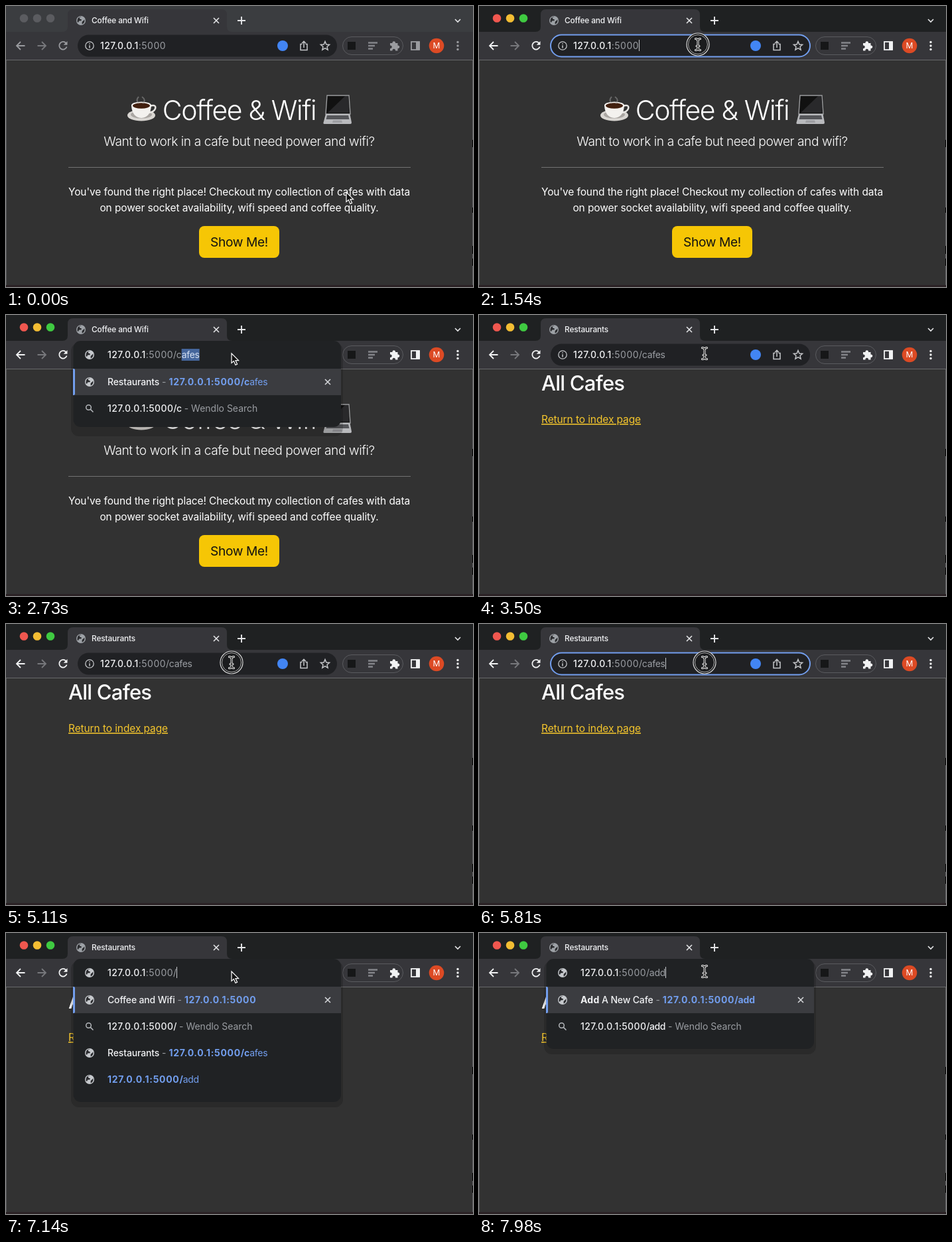
Write an HTML page that moves like this. It is 704 px wide and 424 px high and loops after 8 s.

```html
<!DOCTYPE html>
<html lang="en">
<head>
<meta charset="utf-8">
<title>Coffee and Wifi</title>
<style>
  html, body { margin: 0; width: 100%; height: 100%; overflow: hidden; background: #323232; }
  svg { display: block; width: 704px; height: 424px; --strip: #1f2122; --icon: #f1f2f3; }
  svg.idle { --strip: #3b3d40; --icon: #9a9b9f; }
  text { font-family: Inter, Roboto, sans-serif; font-optical-sizing: none; white-space: pre; fill: #fff; }
  .line { fill: none; stroke: var(--icon); stroke-width: 1.8; }
  .pale { fill: none; stroke: #c4c6c9; stroke-width: 1.5; }
  .ui { font-size: 14px; }
  .mid { text-anchor: middle; }
  .body { font-size: 15.5px; letter-spacing: -.1px; }
  .w, .W { fill: #f1f2f4; }
  .g { fill: #9a9da2; }
  .b, .B { fill: #729eee; }
  .lit { fill: #d5e0f2; }
  .w { font-weight: 500; letter-spacing: -.15px; }
  .W, .B { font-weight: 700; letter-spacing: .22px; }
  .num { letter-spacing: .5px; }
  .w.num { letter-spacing: .35px; }
  .B.num { letter-spacing: .67px; }
  .path { letter-spacing: -.3px; }
  .w.path { letter-spacing: -.4px; }
  .B.path { letter-spacing: -.13px; }
</style>
</head>
<body>
<svg id="stage" viewBox="0 0 704 424" xmlns="http://www.w3.org/2000/svg">
  <defs>
    <g id="globe">
      <circle r="7"/>
      <path transform="scale(-1 1)" fill="#292a2d" d="M-5.4 -1.5 L-1.6 2 V5.6 Q-6 4 -5.4 -1.5Z M-.6 -5.6 L2.6 -5 L1.6 -2.4 L-1 -1.6 L-.4 .2 L3 .4 L3.6 2.6 L5.4 2.4 Q6 -2 3.6 -4.4 L1 -6Z"/>
    </g>
    <g id="lens" fill="none" stroke="#b4b7bb" stroke-width="1.5">
      <circle cx="-1.5" cy="-1.5" r="3.8"/><path d="M1.4 1.4 L5.5 5.5"/>
    </g>
    <path id="cross" d="M-4 -4 L4 4 M4 -4 L-4 4"/>
    <path id="arrow" d="M0 0 V14.5 L3.4 11.4 L6 17.4 L8.6 16.2 L6 10.6 H10.6Z" fill="#111" stroke="#fff" stroke-width="1.2"/>
    <path id="stem" d="M-3.5 -8.5 Q0 -8.5 0 -5.5 Q0 -8.5 3.5 -8.5 M0 -5.5 V5.5 M-3.5 8.5 Q0 8.5 0 5.5 Q0 8.5 3.5 8.5 M-2 2.5 H2"/>
    <g id="beam" fill="none" stroke-linecap="round">
      <use href="#stem" stroke="#fff" stroke-width="3"/>
      <use href="#stem" stroke="#111" stroke-width="1.2"/>
    </g>
  </defs>

  <rect width="704" height="424" fill="#323232"/>

  <g id="home">
    <!-- cup -->
    <ellipse cx="204" cy="165" rx="21" ry="8.5" fill="#d9d6d2"/>
    <ellipse cx="204" cy="164" rx="16" ry="5.5" fill="#aaa6a2"/>
    <path d="M217 151 Q227 148 225 155 Q223 160 215 161" fill="none" stroke="#e8e6e3" stroke-width="2.5"/>
    <path d="M189 150 Q190 168 204 169 Q218 168 219 150Z" fill="#f3f1ee"/>
    <ellipse cx="204" cy="150" rx="15" ry="5.5" fill="#f8f6f3"/>
    <ellipse cx="204" cy="150.5" rx="13" ry="4.2" fill="#42200f"/>
    <path d="M200 147 Q195 142 200 137 M206 147 Q212 142 205 137" fill="none" stroke="#aaa" stroke-width="2" opacity=".45"/>
    <!-- laptop -->
    <path d="M484 135 H517 L519 163 H482Z" fill="#111" stroke="#9b9c9e" stroke-width="1.4"/>
    <path d="M485 161 L511 136 H516 L517.500 161Z" fill="#29292b"/>
    <path d="M482 163 H518.500 L521 176 Q521 178 519 178 H480 Q478 178 478.500 176Z" fill="#b9babd"/>
    <path d="M484 165 H516 L517.500 171 H482.500Z" fill="#55565a"/>
    <path d="M493 172.500 H506 L507 176 H492Z" fill="#9d9ea2"/>

    <text class="mid" x="351.5" y="172" font-size="41" font-weight="300" letter-spacing="-1.35">Coffee &amp; Wifi</text>
    <text class="mid" x="351.5" y="211" font-size="19.2" font-weight="300" letter-spacing="-.43">Want to work in a cafe but need power and wifi?</text>
    <rect x="94" y="243" width="516" height="1" fill="#737373"/>
    <text class="mid body" x="351.5" y="286">You've found the right place! Checkout my collection of cafes with data</text>
    <text class="mid body" x="351.5" y="310">on power socket availability, wifi speed and coffee quality.</text>
    <rect x="291" y="332" width="121" height="48" rx="8" fill="#f6c605"/>
    <text class="mid" x="351.5" y="363" font-size="19.2" letter-spacing="-.4" style="fill:#111">Show Me!</text>
  </g>

  <g id="cafes">
    <text x="94" y="114" font-size="31" font-weight="500" letter-spacing="-.75">All Cafes</text>
    <text class="body" x="94" y="163" style="fill:#f5c62c" text-decoration="underline">Return to index page</text>
  </g>

  <!-- window frame -->
  <rect width="704" height="39" fill="var(--strip)"/>
  <g id="lights"></g>
  <path d="M85 39 Q93 39 93 31 V13 Q93 5 101 5 H325 Q333 5 333 13 V31 Q333 39 341 39Z" fill="#36363a"/>
  <rect y="39" width="704" height="42" fill="#36363a"/>
  <rect y="81" width="704" height="1" fill="#68696b"/>
  <use href="#globe" x="113" y="22" fill="#9da1a6"/>
  <text id="title" class="w" x="129" y="26" font-size="11.9"></text>
  <g fill="none" stroke="#e4e5e7" stroke-width="1.6">
    <use href="#cross" x="317" y="22"/>
    <path d="M349 22 H361 M355 16 V28" stroke-width="1.9"/>
    <path d="M677 20 L681 24 L685 20"/>
  </g>

  <!-- toolbar -->
  <path class="line" d="M28.500 60 H16.500 M22 54 L16 60 L22 66"/>
  <path class="line" d="M47.500 60 H59.500 M54 54 L60 60 L54 66" style="stroke:#77787c"/>
  <path class="line" d="M90.500 56 A5.800 5.800 0 1 0 91.600 61.500"/>
  <path d="M92.500 53 V58.800 H86.700Z" fill="var(--icon)"/>
  <rect id="pill" x="108" y="43.500" width="391" height="33" rx="16.500" fill="#202124" stroke-width="2"/>
  <circle class="pale" cx="126" cy="60" r="6.200" style="stroke-width:1.3"/>
  <path class="pale" d="M126 59.200 V63.500 M126 56.300 V57.800"/>
  <circle cx="417" cy="60" r="8" fill="#4285f4"/>
  <path class="pale" d="M446.500 57.500 H444 V66.500 H454 V57.500 H451.500 M449 63 V53.500 M446 56.300 L449 53.300 L452 56.300"/>
  <path class="pale" d="M481 53.500 L482.900 58 L487.600 58.400 L484 61.500 L485.100 66.200 L481 63.700 L476.900 66.200 L478 61.500 L474.400 58.400 L479.100 58Z"/>
  <rect x="507.500" y="46.500" width="91" height="27" rx="13.500" fill="none" stroke="#5a5b5f"/>
  <rect x="515" y="54" width="12" height="12" fill="#161718"/>
  <path d="M546 55.500 H560 M546 60 H556 M546 64.500 H553" stroke="#84858a" stroke-width="2.4"/>
  <path d="M579 56 H582.500 A2.300 2.300 0 1 1 587 56 H590.500 V59.500 A2.300 2.300 0 1 1 590.500 64 V67.500 H587 A2.300 2.300 0 1 0 582.500 67.500 H579 V64 A2.300 2.300 0 1 0 579 59.500Z" fill="var(--icon)"/>
  <rect class="line" x="611" y="54" width="12" height="12"/>
  <rect x="618" y="54" width="6" height="12" fill="var(--icon)"/>
  <circle cx="649" cy="60" r="11.300" fill="#dc4a24"/>
  <text class="mid" x="649" y="64.300" font-size="12">M</text>
  <g fill="var(--icon)">
    <circle cx="681" cy="54.500" r="1.700"/><circle cx="681" cy="60" r="1.700"/><circle cx="681" cy="65.500" r="1.700"/>
  </g>

  <!-- window edges -->
  <rect y="82" width="1" height="342" fill="#55565a"/>
  <rect x="703" y="82" width="1" height="342" fill="#5c5d60"/>
  <path d="M703.500 202 V213 M703.500 304 V312 M703.500 362 V374 M703.500 381 V392" stroke="#000"/>
  <rect y="421" width="704" height="3" fill="#2b2225"/>

  <g id="menu"></g>
  <rect id="mark" y="51" height="18" fill="#45669c"/>
  <text id="url" class="ui" y="65"></text>
  <rect id="caret" y="51" width="1" height="17" fill="#c4c7cb"/>
  <g id="pointer"></g>
</svg>

<script>
const LOOP = 8000, STEP = 70, HOST = '127.0.0.1', PORT = ':5000', SITE = HOST + PORT;
const $ = id => document.getElementById(id);
const within = (t, spans) => spans.some(([a, b]) => t >= a && t < b);
const show = (el, on) => el.setAttribute('visibility', on ? 'visible' : 'hidden');
const span = (cls, text) => `<tspan class="${cls}">${text}</tspan>`;
const address = (cls, path) => span(cls + ' num', SITE) + span(cls + ' path', path);

// time, typed path (null closes the list), auto-completed tail
const edits = [
  [0, null], [2590, '/'], [2730, '/c', 'afes'], [2870, '/ca', 'fes'], [2940, '/caf', 'es'],
  [3080, '/cafe', 's'], [3220, '/cafes'], [3430, null],
  [6230, '/cafe'], [6650, '/caf'], [6790, '/ca'], [6860, '/c'], [7140, '/'],
  [7280, '/a'], [7350, '/ad'], [7560, '/add']
];
// time, x, y
const route = [
  [700, 513, 281], [980, 349, 110], [1120, 349, 110],
  [1260, 330, 58], [1680, 330, 58], [1960, 340, 58]
];
const presses = [[1330, 1400], [1470, 2030], [5110, 5320], [5810, 5880]];
const selectAll = [[1330, 1470], [5180, 5810]];
const focused = [[1330, 2590], [5180, 6230]];
const caretOn = [[1470, 1960], [2450, 2590], [5810, 6230]];

function pointerAt(t) {
  const i = route.findIndex(k => k[0] > t);
  if (i === 0) return route[0].slice(1);
  if (i < 0) return route[route.length - 1].slice(1);
  const [t0, x0, y0] = route[i - 1], [t1, x1, y1] = route[i];
  const p = (t - t0) / (t1 - t0), e = p * p * (3 - 2 * p);
  return [x0 + (x1 - x0) * e, y0 + (y1 - y0) * e];
}

const visit = (title, path, rest = '') => ({
  icon: 'globe', known: !!title,
  text: (title ? title + span('g', ' - ') : '') + address('B', path) + span('b path', rest)
});
const search = path => ({
  icon: 'lens', text: address('w', path) + span('g', ' - Wendlo Search')
});

function suggest(path, tail) {
  const cafes = (match, rest) => visit(span('w', 'Restaurants'), match, rest);
  if (path === '/') return [
    visit(span('w', 'Coffee and Wifi'), ''), search(path),
    cafes('/c', 'afes'), visit('', '/', 'add')
  ];
  if (tail || path === '/cafes') return [cafes(path, tail), search(path)];
  if (path === '/add') return [
    visit(span('W', 'Add') + span('w', ' A New Cafe'), path), search(path)
  ];
  const full = path[1] === 'a' ? '/add' : '/cafes', rest = full.slice(path.length);
  return [
    visit('', path), search(path),
    full === '/add' ? visit(span('w', 'Add A New Cafe'), path, rest) : cafes(path, rest)
  ];
}

function drawMenu(rows, shrink) {
  const bottom = 95 + 40 * rows.length;
  let out = `<rect x="98" y="42" width="410" height="${bottom - 34}" rx="12" fill="#000" opacity=".17"/>
    <rect x="101.5" y="39" width="403.5" height="${bottom - 39 - shrink}" rx="11" fill="#202224"/>
    <rect x="101.5" y="81" width="403.5" height="40" fill="#3b3c40"/>
    <path d="M101 81 H102 Q104 81 104 83 V119 Q104 121 102 121 H101Z" fill="#729eee"/>
    <use href="#globe" x="126" y="60" fill="#c6c9cd"/>`;
  rows.forEach((row, i) => {
    const y = 101 + 40 * i;
    out += `<use href="#${row.icon}" x="126" y="${y}" fill="#c6c9cd"/>
      <text class="ui" x="153" y="${y + 5}">${row.text}</text>`;
  });
  if (rows[0].known) out += '<use href="#cross" x="485" y="101" stroke="#d5d7da" stroke-width="1.6"/>';
  return out;
}

function drawLights(active) {
  const colors = active ? ['#f0574f', '#f3bd33', '#3fca41'] : Array(3).fill('#5b5c60');
  return colors.map((c, i) => `<circle cx="${27 + 20 * i}" cy="18.500" r="6.300" fill="${c}"/>`).join('');
}

function drawUrl(t, path, tail, open) {
  const url = $('url'), x = open ? 153 : 142, all = within(t, selectAll);
  url.setAttribute('x', x);
  url.innerHTML = all ? address('lit', path)
    : span('w num', HOST) + span('g num', PORT) + span('g path', path) + span('lit path', tail);
  const endX = n => url.getEndPositionOfChar(n - 1).x;
  const typedEnd = endX((SITE + path).length);
  const from = all ? x : typedEnd;
  const to = tail ? endX((SITE + path + tail).length) : typedEnd;
  $('mark').setAttribute('x', from);
  $('mark').setAttribute('width', Math.max(0, to - from));
  show($('mark'), all || tail);
  $('caret').setAttribute('x', Math.round(typedEnd));
  show($('caret'), (open && !tail) || within(t, caretOn));
}

function drawPointer(t, open) {
  const [x, y] = pointerAt(t);
  const arrow = t < 1260 || (open && t < 7980);
  const ring = within(t, presses)
    ? `<circle cx="${x}" cy="${y}" r="17" fill="#1b1c1e" stroke="#d8d8d8" stroke-width="1.2"/>
       <circle cx="${x}" cy="${y}" r="14.500" fill="none" stroke="#bbb" stroke-width=".9"/>` : '';
  return ring + `<use href="#${arrow ? 'arrow' : 'beam'}" x="${x}" y="${y}"/>`;
}

function render(t) {
  const [, typed, tail = ''] = edits.filter(e => e[0] <= t).pop();
  const open = typed !== null, active = t >= 1330, moved = t >= 3500;
  $('stage').setAttribute('class', active ? '' : 'idle');
  $('lights').innerHTML = drawLights(active);
  show($('home'), !moved);
  show($('cafes'), moved);
  $('title').textContent = moved ? 'Restaurants' : 'Coffee and Wifi';
  $('pill').setAttribute('stroke', within(t, focused) ? '#729eee' : 'none');
  $('menu').innerHTML = open ? drawMenu(suggest(typed, tail), t < 2800 ? 6 : 0) : '';
  drawUrl(t, open ? typed : t < 3430 ? '' : '/cafes', tail, open);
  $('pointer').innerHTML = drawPointer(t, open);
}

let shown = -1;
function tick() {
  const t = Math.floor(performance.now() % LOOP / STEP) * STEP;
  if (t !== shown) render(shown = t);
  requestAnimationFrame(tick);
}
tick();
</script>
</body>
</html>
```
